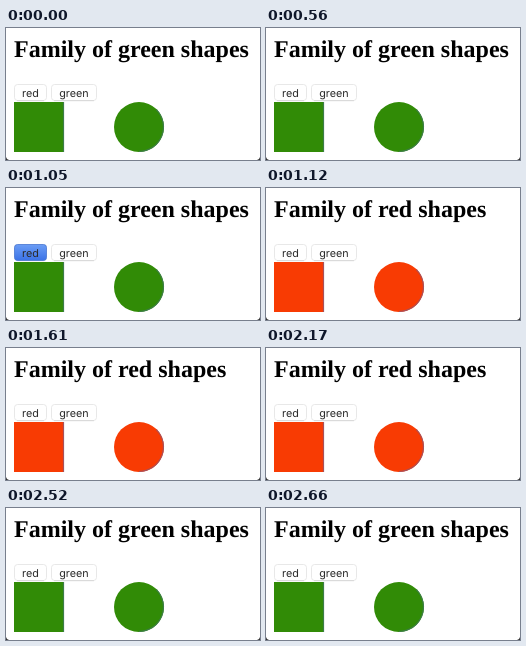
An HTML page for the animation above (3710 ms loop, 254 by 132 pixels).

```html
<!DOCTYPE html>
<html lang="en">
<head>
<meta charset="utf-8">
<title>Family of shapes</title>
<style>
  html, body { margin: 0; width: 100%; height: 100%; overflow: hidden; background: #fff; }
  svg { display: block; width: 254px; height: 132px; }
  text { text-rendering: geometricPrecision; }
  .title { font: bold 24px "Liberation Serif", "Times New Roman", serif; fill: #000; }
  .label { font: 10.800px Inter, "Liberation Sans", sans-serif; fill: #2a2a2a; text-anchor: middle; }
  .key { fill: #fff; stroke: #e2e2e2; stroke-width: .8; }
  .lip { stroke: #d2d2d2; stroke-width: .8; }
  .down { fill: url(#blue); stroke: #4b78d2; stroke-width: .8; }
  .edge { fill: none; stroke-width: 1.200; }

  .shape, .edge, .red-on, .green-on, .down { animation: 3710ms step-end infinite; }
  .shape { animation-name: paint; }
  .edge { animation-name: shade; }
  .red-on { animation-name: showRed; }
  .green-on { animation-name: showGreen; }
  .press-red { animation-name: pressRed; }
  .press-green { animation-name: pressGreen; }

  /* red clicked 910-1120 ms, green clicked 2310-2520 ms */
  @keyframes paint {
    0%, 67.925% { fill: #318b06; }
    30.189% { fill: #f83b03; }
  }
  @keyframes shade {
    0%, 67.925% { stroke: #3c7d48; }
    30.189% { stroke: #a8505a; }
  }
  @keyframes showRed {
    0%, 67.925% { opacity: 0; }
    30.189% { opacity: 1; }
  }
  @keyframes showGreen {
    0%, 67.925% { opacity: 1; }
    30.189% { opacity: 0; }
  }
  @keyframes pressRed {
    0%, 30.189% { opacity: 0; }
    24.528% { opacity: 1; }
  }
  @keyframes pressGreen {
    0%, 67.925% { opacity: 0; }
    62.264% { opacity: 1; }
  }
</style>
</head>
<body>
<svg viewBox="0 0 254 132">
  <defs>
    <linearGradient id="blue" x2="0" y2="1">
      <stop offset="0" stop-color="#6b9df5"/>
      <stop offset="1" stop-color="#3b72e6"/>
    </linearGradient>
  </defs>

  <path d="M0 129V132H3Q.5 131.5 0 129ZM254 129V132H251Q253.500 131.500 254 129Z" fill="#333"/>

  <text class="title green-on" x="8" y="29">Family of green shapes</text>
  <text class="title red-on" x="8" y="29">Family of red shapes</text>

  <rect class="key" x="8.500" y="56.500" width="32" height="16" rx="3"/>
  <path class="lip" d="M11 72.700H38"/>
  <rect class="down press-red" x="8.500" y="56.500" width="32" height="16" rx="3"/>
  <text class="label" x="24.500" y="69">red</text>

  <rect class="key" x="45.500" y="56.500" width="45" height="16" rx="3"/>
  <path class="lip" d="M48 72.700H88"/>
  <rect class="down press-green" x="45.500" y="56.500" width="45" height="16" rx="3"/>
  <text class="label" x="68" y="69">green</text>

  <rect class="shape" x="8" y="74" width="50" height="50"/>
  <path class="edge" d="M57.500 74V124"/>
  <circle class="shape" cx="133" cy="99" r="25"/>
  <path class="edge" d="M150.300 81.700A24.500 24.500 0 0 1 133 123.500"/>
</svg>
</body>
</html>
```
